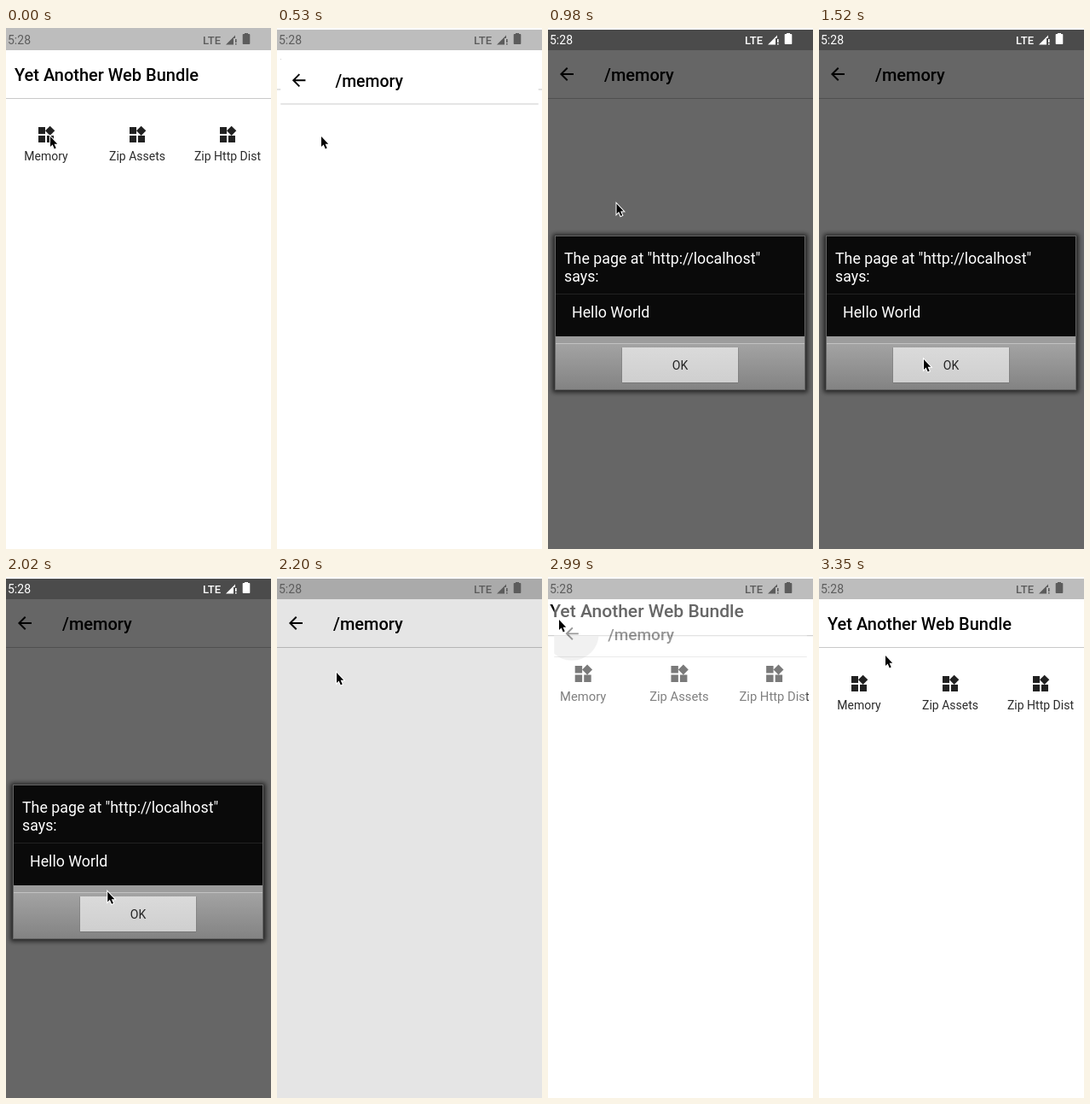
Recreate the animation shown at these times as an HTML page. Size 311 by 610 pixels, loop 3440 ms.

```html
<!DOCTYPE html>
<html lang="en">
<head>
<meta charset="utf-8">
<title>Web bundle demo</title>
<style>
  html, body { margin: 0; width: 100%; height: 100%; overflow: hidden; background: #fff; }
  svg { display: block; width: 311px; height: 610px; }
  text { font-family: Roboto, sans-serif; font-size: 14px; white-space: pre; }
  .title { font-size: 20px; font-weight: 500; }
  .label { fill: #2b2b2b; text-anchor: middle; }
  .message text { font-size: 17.8px; fill: #fff; }
</style>
</head>
<body>
<svg viewBox="0 0 311 610">
  <defs>
    <path id="widgets" fill="#212121" d="M13 13v8h8v-8h-8zM3 21h8v-8H3v8zM3 3v8h8V3H3zm13.66-1.31L11 7.34 16.66 13l5.66-5.66-5.66-5.65z"/>
    <linearGradient id="panel" x2="0" y2="1">
      <stop stop-color="#a3a3a3"/><stop offset="1" stop-color="#838383"/>
    </linearGradient>
    <linearGradient id="face" x2="0" y2="1">
      <stop stop-color="#dadada"/><stop offset="1" stop-color="#cfcfcf"/>
    </linearGradient>
    <filter id="blur" x="-10%" y="-10%" width="120%" height="120%"><feGaussianBlur stdDeviation="2.5"/></filter>
    <clipPath id="splashClip"><rect id="splashArea" width="311" height="90"/></clipPath>
  </defs>

  <rect width="311" height="610" fill="#fff"/>

  <g id="home">
    <rect y="82" width="311" height="1" fill="#c9c9c9"/>
    <text class="title" x="10" y="62">Yet Another Web Bundle</text>
    <use href="#widgets" x="35" y="113"/>
    <use href="#widgets" x="142" y="113"/>
    <use href="#widgets" x="248" y="113"/>
    <text class="label" x="47" y="155">Memory</text>
    <text class="label" x="154" y="155">Zip Assets</text>
    <text class="label" x="260" y="155">Zip Http Dist</text>
  </g>

  <g id="memory">
    <rect width="311" height="670" fill="#fff"/>
    <rect y="82" width="311" height="1" fill="#c9c9c9"/>
    <g clip-path="url(#splashClip)"><circle id="splash" cx="22" cy="54" fill-opacity=".13"/></g>
    <path transform="translate(10 42)" d="M20 11H7.83l5.59-5.59L12 4l-8 8 8 8 1.41-1.41L7.83 13H20v-2z"/>
    <text class="title" x="66" y="62">/memory</text>
  </g>

  <rect width="311" height="26" fill="#bdbdbd"/>
  <rect id="scrim" y="2" width="311" height="608"/>

  <g id="dialog">
    <rect x="5" y="241" width="300" height="186" rx="3" fill-opacity=".6" filter="url(#blur)"/>
    <rect x="8" y="243" width="294" height="181" fill="#666"/>
    <rect x="9" y="244" width="292" height="117" fill="#0a0a0a"/>
    <rect x="9" y="311" width="292" height="1" fill="#222"/>
    <g class="message">
      <text x="19" y="276">The page at "http://localhost"</text>
      <text x="19" y="297">says:</text>
      <text x="28" y="339">Hello World</text>
    </g>
    <rect x="9" y="361" width="292" height="9" fill="#9c9c9c"/>
    <rect x="9" y="370" width="292" height="53" fill="url(#panel)"/>
    <rect x="9" y="369" width="292" height="1" fill="#c2c2c2"/>
    <rect x="86.5" y="374" width="137" height="42" rx="1" fill="#777"/>
    <rect x="87" y="374" width="136" height="41" fill="url(#face)"/>
    <rect id="press" x="87" y="374" width="136" height="41" fill-opacity=".2"/>
    <text x="155" y="400" text-anchor="middle" fill="#222">OK</text>
  </g>

  <g id="status">
    <text x="2" y="19">5:28</text>
    <text x="231" y="19" font-weight="500" style="font-size: 13px">LTE</text>
    <path d="M258 19.5L269 8.5V12H267V19.5ZM269 13h1.6v4H269zM269 18h1.6v1.5H269z"/>
    <path d="M280 7V6h4v1h1.5q.8 0 .8 .8V18.2q0 .8-.8 .8h-7q-.8 0-.8-.8V7.8q0-.8 .8-.8Z"/>
  </g>

  <rect id="strip" width="311" height="2" fill="#fafafa"/>
  <path id="cursor" d="M1 2V14L3.6 11.4 5.8 16.4 7.7 15.6 5.6 10.7H9.2Z" stroke="#fff" stroke-width="2" paint-order="stroke"/>
</svg>

<script>
const LOOP = 3440, STEP = 90;
const $ = id => document.getElementById(id);

const ramp = (t, from, to) => Math.min(1, Math.max(0, (t - from) / (to - from)));
const easeOut = p => 1 - (1 - p) ** 3;
const smooth = p => p * p * (3 - 2 * p);

// Pointer stops: time, x, y.
const stops = [
  [530, 51, 125], [800, 70, 163], [1460, 122, 386], [1985, 122, 386],
  [2200, 69, 110], [2540, 13, 48], [2990, 12, 48], [3350, 77, 90]
];

function pointer(t) {
  let [, x, y] = stops[0];
  for (let i = 1; i < stops.length; i++) {
    const [t0, x0, y0] = stops[i - 1], [t1, x1, y1] = stops[i];
    const p = smooth(ramp(t, t0, t1));
    x += (x1 - x0) * p;
    y += (y1 - y0) * p;
  }
  return [x, y];
}

// The screen refreshes every STEP ms, with two rests.
function refresh(t) {
  if (t < 350) return t;
  if (t >= 1760 && t < 2020) return 1760;
  const base = t < 1760 ? 350 : t < 2540 ? 2020 : 2540;
  return base + STEP * Math.floor((t - base) / STEP);
}

function zoom(id, s, cx, cy) {
  $(id).setAttribute("transform", `translate(${cx} ${cy}) scale(${s}) translate(${-cx} ${-cy})`);
}

function draw(now) {
  const t = refresh(now % LOOP);

  // Page push and pop
  const push = easeOut(ramp(t, 400, 700)), pop = easeOut(ramp(t, 2945, 3185));
  const fade = ramp(t, 2945, 3020);
  zoom("home", t < 2945 ? 1 + .05 * push : 1.1 - .1 * pop, 155.5, 340);
  zoom("memory", .85 + .15 * push - .1 * pop, 155.5, 320);
  $("memory").style.opacity = ramp(t, 400, 510) - fade;
  $("splash").setAttribute("r", 33 * ramp(t, 2600, 2990));
  $("splashArea").setAttribute("y", 26 + 52 * fade);

  // Alert
  zoom("dialog", .9 + .1 * easeOut(ramp(t, 740, 910)), 155, 333.5);
  $("dialog").style.opacity = ramp(t, 740, 830) - ramp(t, 2050, 2150);
  $("scrim").style.opacity = .6 * (ramp(t, 760, 938) - ramp(t, 2050, 2230));
  $("press").style.opacity = +(t >= 1700 && t < 2020);
  const tint = Math.round(92 + 163 * (ramp(t, 720, 820) - ramp(t, 2050, 2190)));
  $("status").setAttribute("fill", `rgb(${tint},${tint},${tint})`);

  $("strip").style.opacity = +(t >= 80);
  $("cursor").setAttribute("transform", `translate(${pointer(t)})`);
}

const start = performance.now();
function tick() {
  draw(performance.now() - start);
  requestAnimationFrame(tick);
}
tick();
</script>
</body>
</html>
```
